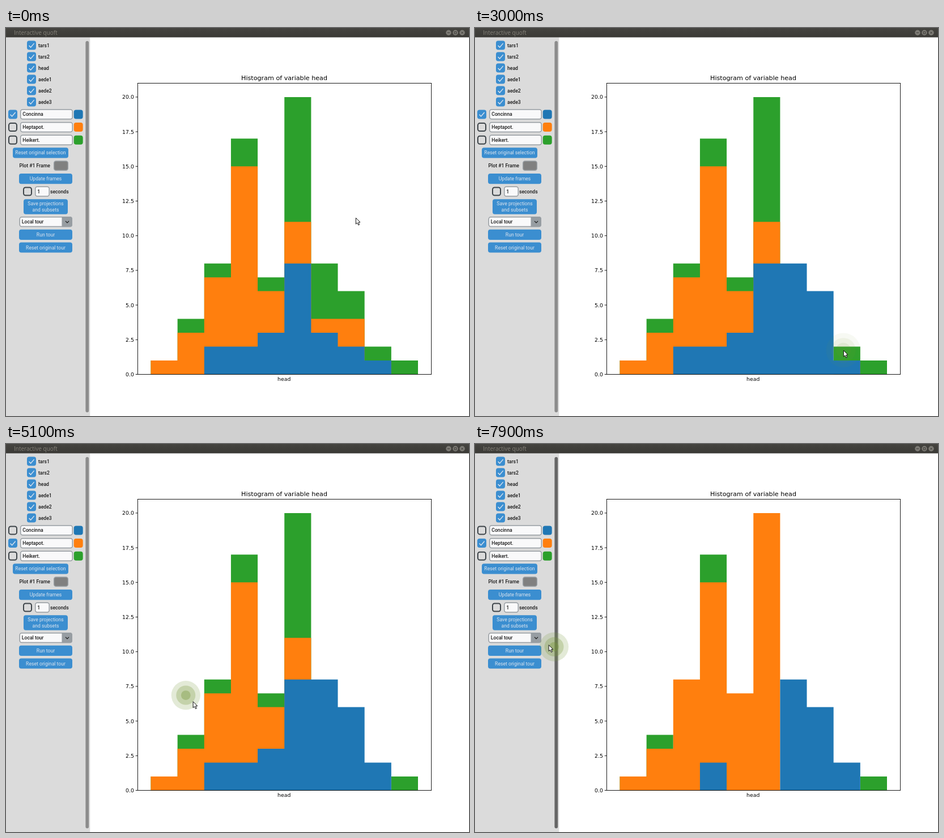
These frames come from a looping animation (817x685 px, 8000 ms). An HTML page with a canvas:

```html
<!DOCTYPE html>
<html lang="en">
<head>
<meta charset="utf-8">
<title>Interactive histogram</title>
<style>
html, body { margin: 0; width: 100%; height: 100%; overflow: hidden; background: #fff; }
canvas { display: block; }
</style>
</head>
<body>
<canvas id="stage" width="817" height="685"></canvas>
<script>
const c = document.getElementById('stage').getContext('2d');
const LOOP = 8000, STEP = 100, HOLD = 160;
const BUTTON = '#3b8ed0', PALE = '#dce4ee', BORDER = '#979da2', INK = '#1a1a1a';
const UI = '8.65px Roboto, sans-serif', UI_DARK = '500 ' + UI;
const PLOT = '9.3px "DejaVu Sans", sans-serif';

// Counts per bin, stacked from the bottom
const groups = [
  { name: 'Concinna', color: '#1f77b4', counts: [0, 0, 2, 2, 3, 8, 3, 2, 1, 0] },
  { name: 'Heptapot.', color: '#ff7f0e', counts: [1, 3, 5, 13, 3, 3, 1, 2, 0, 0] },
  { name: 'Heikert.', color: '#2ca02c', counts: [0, 1, 1, 2, 1, 9, 4, 2, 1, 1] }
];

// The pointer glides to each stop and clicks there: a bin is painted in the group's
// colour, a stop without a bin selects the group
const stops = [
  { from: 0, to: 800, x: 564, y: 455, press: 1500, bin: 6, group: 0 },
  { from: 1700, to: 2300, x: 614, y: 515, press: 2400, bin: 7, group: 0 },
  { from: 2600, to: 3000, x: 650, y: 569, press: 3200, bin: 8, group: 0 },
  { from: 3300, to: 4400, x: 12, y: 175, press: 4700, group: 1 },
  { from: 4760, to: 5400, x: 386, y: 504, press: 5600, bin: 2, group: 1 },
  { from: 5800, to: 6400, x: 474, y: 498, press: 6600, bin: 4, group: 1 },
  { from: 6700, to: 7300, x: 530, y: 500, press: 7500, bin: 5, group: 1 },
  { from: 7550, to: 8050, x: 109, y: 347, press: Infinity }
];

function pointer(t) {
  let x = 617, y = 335;
  for (const s of stops) {
    const u = Math.min(1, Math.max(0, (t - s.from) / (s.to - s.from)));
    const k = 1 - (1 - u) ** 2.5;
    x += (s.x - x) * k;
    y += (s.y - y) * k;
  }
  return [x, y];
}

function rect(x, y, w, h, color) {
  c.fillStyle = color;
  c.fillRect(x, y, w, h);
}

function round(x, y, w, h, r, fill, border, width = 1.5) {
  const d = border ? width / 2 : 0;
  c.beginPath();
  c.roundRect(x + d, y + d, w - 2 * d, h - 2 * d, r);
  if (fill) { c.fillStyle = fill; c.fill(); }
  if (border) { c.strokeStyle = border; c.lineWidth = width; c.stroke(); }
}

function line(points, color, width) {
  c.beginPath();
  points.forEach(([x, y]) => c.lineTo(x, y));
  c.strokeStyle = color;
  c.lineWidth = width;
  c.stroke();
}

function disc(x, y, r, color) {
  c.beginPath();
  c.arc(x, y, r, 0, 7);
  c.fillStyle = color;
  c.fill();
}

function text(str, x, y, font, color, align = 'left') {
  c.font = font;
  c.fillStyle = color;
  c.textAlign = align;
  c.fillText(str, x, y);
}

function checkbox(x, y, on) {
  if (!on) return round(x, y, 16, 16, 3.5, null, '#3e454a', 2);
  round(x, y, 16, 16, 4, BUTTON);
  line([[x + 3.6, y + 8.4], [x + 6.6, y + 11.6], [x + 12.6, y + 4.6]], PALE, 1.4);
}

// Buttons are centred on the sidebar's axis
function button(y, w, h, ...lines) {
  round(70 - w / 2, y, w, h, 4, BUTTON);
  lines.forEach((s, i) => {
    text(s, 70, y + h / 2 + 3 + (i - (lines.length - 1) / 2) * 11.3, UI, PALE, 'center');
  });
}

function entry(x, y, w, h, str) {
  round(x, y, w, h, 3.5, '#f9f9fa', BORDER);
  text(str, x + 4.3, y + h / 2 + 3, UI_DARK, INK);
}

function titleBar() {
  const g = c.createLinearGradient(0, 0, 0, 17);
  g.addColorStop(0, '#454440');
  g.addColorStop(1, '#3a3935');
  rect(0, 0, 817, 16.5, g);
  text('Interactive quoft', 14, 11.5, '10px "Open Sans", sans-serif', '#85827a');
  for (const x of [781, 793, 805]) disc(x, 8.3, 4.7, '#7c7a74');
  line([[778.8, 8.3], [783.2, 8.3]], '#3c3b37', 1);
  c.strokeRect(791.2, 6.5, 3.6, 3.6);
  line([[803.3, 6.6], [806.7, 10]], '#3c3b37', 1);
  line([[806.7, 6.6], [803.3, 10]], '#3c3b37', 1);
}

function sidebar(t) {
  rect(0, 16.5, 148.3, 668.5, '#dbdbdb');
  const hot = pointer(t - STEP)[0] > 146 && pointer(t)[0] <= 146;
  round(140.4, 23, 5.8, 655.5, 2.9, hot ? '#666' : '#8c8c8c');

  ['tars1', 'tars2', 'head', 'aede1', 'aede2', 'aede3'].forEach((s, i) => {
    checkbox(37, 22.5 + i * 20, true);
    text(s, 57, 33.5 + i * 20, UI_DARK, INK);
  });

  const active = stops.some(s => s.group === 1 && t >= s.press) ? 1 : 0;
  groups.forEach(({ name, color }, i) => {
    const y = 144.4 + i * 22.7;
    checkbox(4, y, i === active);
    entry(25, y - 1.2, 93, 18.4, name);
    round(119.7, y, 16, 16, 4, color);
  });

  c.save();
  c.translate(-9, 0);
  button(211.3, 98, 18.2, 'Reset original selection');
  c.restore();
  text('Plot #1 Frame', 23.5, 246, UI_DARK, INK);
  round(84, 234.3, 26, 17.7, 3.5, '#808080', BORDER);
  button(257, 94, 18.2, 'Update frames');
  checkbox(30, 280.5, false);
  entry(51, 279.4, 26, 18.4, '1');
  text('seconds', 78, 291.7, UI_DARK, INK);
  button(302.3, 78, 26.4, 'Save projections', 'and subsets');

  entry(23.5, 333, 93.5, 18.2, 'Local tour');
  round(98.5, 333, 18.5, 18.2, [0, 4, 4, 0], BORDER);
  line([[105, 340.8], [108, 343.8], [111, 340.8]], INK, 1.2);

  button(355.8, 94, 18.2, 'Run tour');
  button(378.4, 94, 18.2, 'Reset original tour');
}

function chart(t) {
  const base = 611.5, bin = 47.15;
  const level = v => base - 24.48 * v;

  // Every layer reaches the axis, so the lower ones cover the upper ones
  for (let g = 2; g >= 0; g--) {
    c.beginPath();
    for (let i = 0; i < 10; i++) {
      const paint = stops.find(s => s.bin === i && t >= s.press);
      if (paint && paint.group !== g) continue;
      const stack = groups.slice(0, paint ? 3 : g + 1);
      const sum = stack.reduce((n, s) => n + s.counts[i], 0);
      c.rect(255.5 + bin * i, level(sum), bin, base - level(sum));
    }
    c.fillStyle = groups[g].color;
    c.fill();
  }

  c.strokeStyle = '#000';
  c.lineWidth = 0.9;
  c.strokeRect(232.4, 97.5, 518.2, 514);
  for (let v = 0; v <= 20; v += 2.5) {
    const y = level(v);
    line([[228.7, y], [232.4, y]], '#000', 0.9);
    text(v.toFixed(1), 225.8, y + 3.5, PLOT, '#000', 'right');
  }
  text('Histogram of variable head', 491, 91.5, '11.15px "DejaVu Sans", sans-serif', '#000', 'center');
  text('head', 490.7, 623, PLOT, '#000', 'center');
}

// A dot while pressed, then three rings that spread, fade and trail the pointer
function ripple(t) {
  const [x, y] = pointer(t - 25);
  const tint = a => `rgba(118,150,58,${a})`;
  for (const { press } of stops) {
    const u = (t - press - HOLD) / 520;
    if (t < press || u >= 1) continue;
    if (u <= 0) {
      disc(x, y, 12, tint(0.6));
      continue;
    }
    const r = 12 + 20 * u ** 0.5;
    for (let i = 0; i < 3; i++) {
      disc(x, y, Math.max(0, r - i * 8.6), tint((0.38 + i * 0.15) * (1 - u)));
    }
  }
}

function cursor(t) {
  const [x, y] = pointer(t);
  c.save();
  c.translate(x, y);
  if (x > 25 && x < 118 && y > 143 && y < 207) {
    c.translate(0, -3);
    for (const [color, w] of [['#fff', 2.4], ['#111', 1.1]]) {
      line([[-2.5, 0], [2.5, 0]], color, w);
      line([[0, 0], [0, 10]], color, w);
      line([[-2.5, 10], [2.5, 10]], color, w);
    }
  } else {
    c.beginPath();
    [[0.4, 0.2], [0.4, 11.2], [2.9, 8.9], [4.8, 13], [6.6, 12.2], [4.8, 8.2], [8, 8]]
      .forEach(p => c.lineTo(...p));
    c.closePath();
    c.fillStyle = '#fff';
    c.fill();
    c.strokeStyle = '#111';
    c.lineWidth = 1;
    c.stroke();
  }
  c.restore();
}

const start = performance.now();
function draw() {
  const t = Math.floor((performance.now() - start) % LOOP / STEP) * STEP;
  rect(0, 0, 817, 685, '#fff');
  sidebar(t);
  titleBar();
  chart(t);
  ripple(t);
  cursor(t);
  requestAnimationFrame(draw);
}
draw();
</script>
</body>
</html>
```
